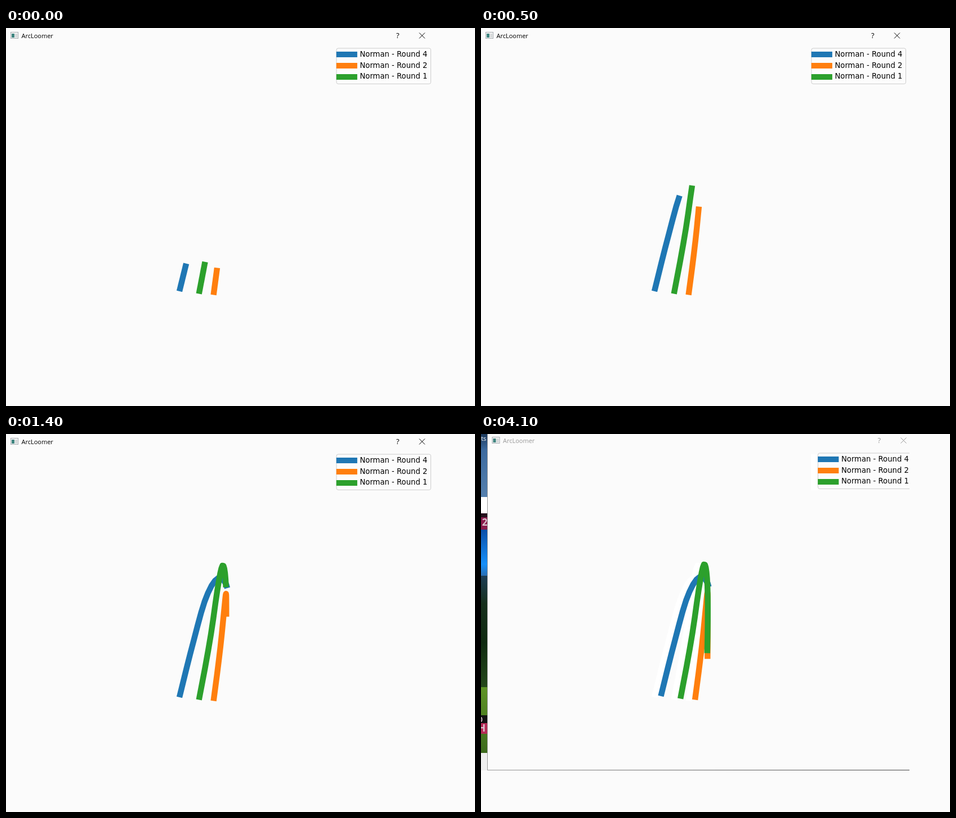
Recreate the animation shown at these times as an HTML page. Size 833 by 672 pixels, loop 4.2 s.

```html
<!DOCTYPE html>
<html lang="en">
<head>
<meta charset="utf-8">
<title>Shot trails</title>
<style>
  html, body { margin: 0; width: 100%; height: 100%; overflow: hidden; background: #fbfbfb; }
  svg { display: block; }
  polyline { fill: none; stroke-width: 10.4; stroke-linejoin: round; }
  #legend text { font: 13.2px "DejaVu Sans", sans-serif; }
  #bar { font: 11px "Open Sans", sans-serif; }
  #desktop text { font: bold 17px "Open Sans", sans-serif; fill: #d9c3cf; }
</style>
</head>
<body>
<svg width="833" height="672" viewBox="0 0 833 672">
  <defs>
    <clipPath id="screen"><rect width="761" height="598"/></clipPath>
    <linearGradient id="wall" x2="0" y2="1"><stop stop-color="#1d3a5c"/><stop offset=".25" stop-color="#3c6a9f"/><stop offset="1" stop-color="#5580ae"/></linearGradient>
    <linearGradient id="sky" x2="0" y2="1"><stop stop-color="#0b4fa8"/><stop offset=".75" stop-color="#1690fa"/><stop offset="1" stop-color="#2a6fb4"/></linearGradient>
    <linearGradient id="trees" x2="0" y2="1"><stop stop-color="#1c3d55"/><stop offset=".25" stop-color="#16301c"/><stop offset=".6" stop-color="#0f2a10"/><stop offset="1" stop-color="#24481a"/></linearGradient>
    <linearGradient id="grass" x2="0" y2="1"><stop stop-color="#5f9426"/><stop offset="1" stop-color="#3c6a1c"/></linearGradient>
    <linearGradient id="edge"><stop stop-color="#999"/><stop offset=".3" stop-color="#777"/><stop offset="1" stop-color="#444"/></linearGradient>
  </defs>

  <g id="desktop" clip-path="url(#screen)">
    <rect width="11" height="112" fill="url(#wall)"/>
    <rect y="112" width="11" height="29" fill="#fff"/>
    <rect y="141" width="11" height="7" fill="#24101c"/>
    <rect y="148" width="11" height="22" fill="#8a1c4c"/>
    <rect y="170" width="11" height="82" fill="url(#sky)"/>
    <rect y="252" width="11" height="198" fill="url(#trees)"/>
    <rect y="450" width="11" height="117" fill="url(#grass)"/>
    <rect y="500" width="11" height="14" fill="#111"/>
    <rect y="514" width="11" height="19" fill="#b52a55"/>
    <rect y="567" width="11" height="31" fill="#eee"/>
    <text x="-6" y="12" style="font-size:11px;font-weight:400;fill:#fff">ets</text>
    <text x="-8" y="163">12</text>
    <text x="-4" y="512" style="font-size:12px">0</text>
    <text x="-5" y="529">H</text>
    <rect x="11" width="750" height="598" fill="#fbfbfb"/>
    <path d="M11.5 0V598" stroke="#999"/>
    <path d="M11 597H761V598H11z" fill="url(#edge)"/>
    <rect x="586" y="36" width="13" height="64" fill="#fff"/>
    <g id="ghost"></g>
  </g>

  <g id="clip">
    <g id="window">
      <g id="icon">
        <rect x="8.5" y="7.5" width="13" height="11" fill="#f4f4f4" stroke="#a5abb0"/>
        <rect x="10" y="10" width="5" height="7" fill="#3f8580"/>
        <rect x="16" y="10" width="4" height="7" fill="#d5d9da"/>
      </g>
      <g id="bar">
        <text x="27.5" y="18">ArcLoomer</text>
        <text x="693" y="18" style="font-size:13px">?</text>
        <path d="M734 8.5L744 18.5M744 8.5L734 18.5" stroke="currentColor"/>
      </g>
      <g id="legend">
        <rect x="587" y="36" width="167.5" height="63.3" rx="3" fill="#fcfcfc" stroke="#ccc"/>
      </g>
      <g id="trails"></g>
    </g>
  </g>
</svg>

<script>
const STEP = 100, LOOP = 4200, DRAG_AT = 4100;

// Times, in steps, at which every flight passes its key points; the last one is its landing.
const LAUNCH = -1.7, KEY_TIMES = [LAUNCH, 2, 5, 9, 12];

const trails = [
  { label: "Norman - Round 4", color: "#1f77b4", landing: 13,
    keys: [[308, 468], [333.7, 366], [352.7, 298], [376.5, 256.5], [391, 267], [393, 274]] },
  { label: "Norman - Round 2", color: "#ff7f0e", landing: 18,
    keys: [[368.6, 474.5], [381, 377], [387, 317.5], [390.7, 284], [391.2, 301], [390.8, 401.7]] },
  { label: "Norman - Round 1", color: "#2ca02c", landing: 19,
    keys: [[342.7, 472.5], [364, 356], [375, 280], [384.5, 234], [389, 247.5], [390.3, 391.7]] }
];

const byId = id => document.getElementById(id);

function add(parent, tag, attributes) {
  const node = document.createElementNS("http://www.w3.org/2000/svg", tag);
  for (const name in attributes) node.setAttribute(name, attributes[name]);
  return byId(parent).appendChild(node);
}

// Value at time t of the parabola through the keys first .. first + 2.
function parabola(times, keys, axis, first, t) {
  const [a, b, c] = times.slice(first);
  const [p, q, r] = keys.slice(first).map(key => key[axis]);
  return p * (t - b) * (t - c) / ((a - b) * (a - c))
       + q * (t - a) * (t - c) / ((b - a) * (b - c))
       + r * (t - a) * (t - b) / ((c - a) * (c - b));
}

// Blends the parabolas of neighbouring keys into one smooth flight.
function position({ keys, landing }, t) {
  const times = [...KEY_TIMES, landing];
  const last = times.length - 3;
  const i = Math.max(0, times.findIndex(time => time >= t) - 1);
  const mix = (t - times[i]) / (times[i + 1] - times[i]);
  return [0, 1].map(axis =>
    (1 - mix) * parabola(times, keys, axis, Math.min(last, Math.max(0, i - 1)), t)
    + mix * parabola(times, keys, axis, Math.min(last, i), t));
}

function path(trail, step) {
  const points = [position(trail, LAUNCH)];
  for (let t = 0; t <= Math.min(step, trail.landing); t++) points.push(position(trail, t));
  return points.join(" ");
}

trails.forEach((trail, row) => {
  const { label, color, landing } = trail;
  add("legend", "rect", { x: 586.7, y: 42 + 20 * row, width: 37.2, height: 10, fill: color });
  add("legend", "text", { x: 628.5, y: 51.2 + 19.6 * row }).textContent = label;
  add("ghost", "polyline", { points: path(trail, landing), stroke: "#fff" });
  trail.line = add("trails", "polyline", { stroke: color });
});

function draw(now) {
  const time = now % LOOP;
  const dragged = time >= DRAG_AT;

  for (const trail of trails)
    trail.line.setAttribute("points", path(trail, Math.floor(time / STEP)));

  byId("desktop").style.display = dragged ? "" : "none";
  byId("clip").setAttribute("clip-path", dragged ? "url(#screen)" : "none");
  byId("window").setAttribute("transform", dragged ? "translate(11.5 -2)" : "");
  byId("bar").style.color = byId("bar").style.fill = dragged ? "#999" : "#000";
  requestAnimationFrame(draw);
}
draw(performance.now());
</script>
</body>
</html>
```
